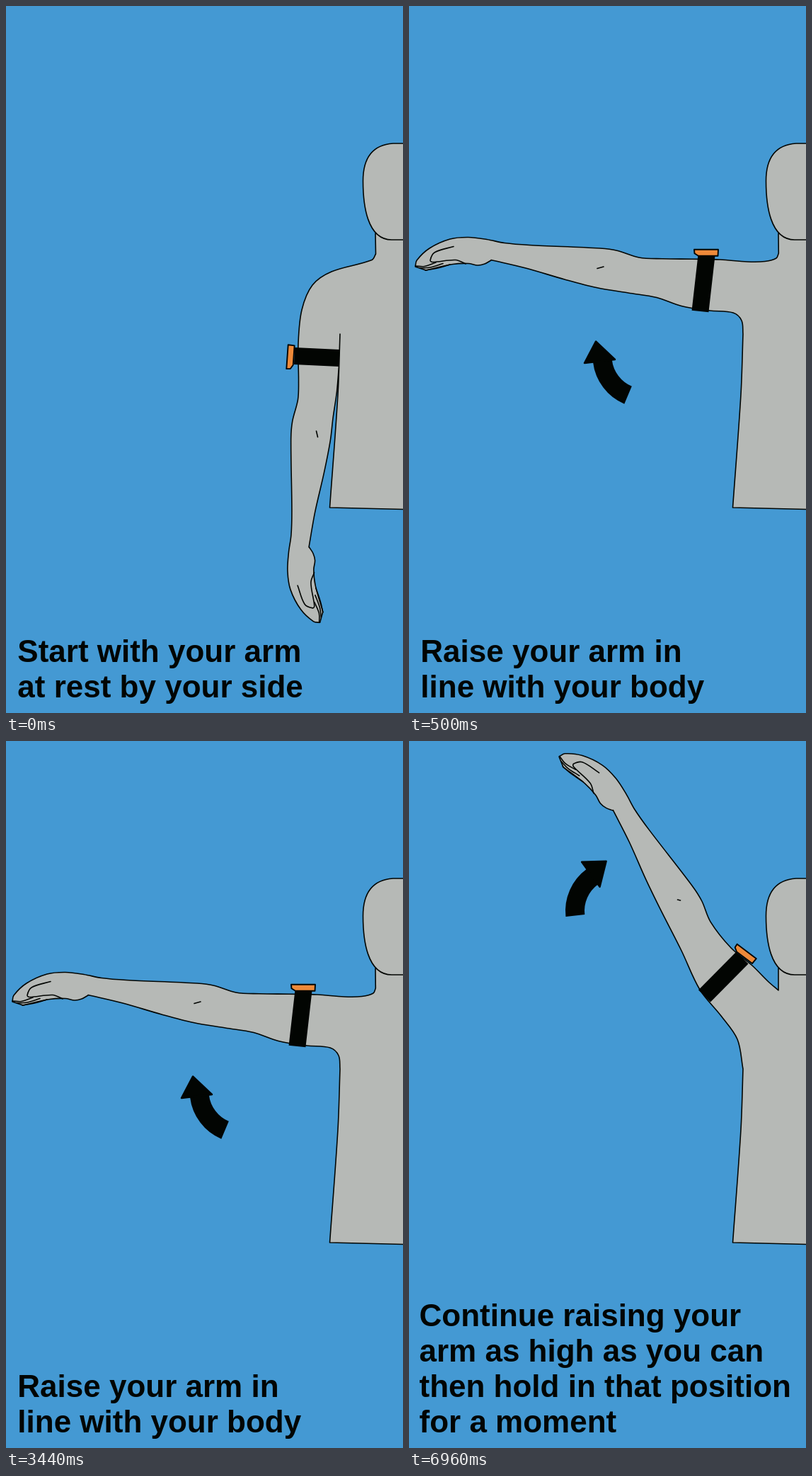
An HTML page with a canvas that plays this animation: 561 by 998 pixels, repeating every 8000 ms.

```html
<!DOCTYPE html>
<html lang="en">
<head>
<meta charset="utf-8">
<title>Arm raise</title>
<style>
html, body { margin: 0; width: 100%; height: 100%; overflow: hidden; background: #4499d3; }
canvas { display: block; width: 100vw; height: 100vh; }
</style>
</head>
<body>
<canvas id="stage" width="561" height="998"></canvas>
<script>
const ctx = document.getElementById('stage').getContext('2d');
const BLUE = '#4499d3', GREY = '#b6b9b6', INK = '#020502', ORANGE = '#ee8a3a';
const LOOP = 8000, LINE = 1.6;

const points = text => text.trim().split(/\s+/).map(p => p.split(',').map(Number));
const rad = deg => deg * Math.PI / 180;

// Smooth curve through the points, with handles a third of each step long.
function trace(pts) {
  const dirs = pts.map((p, i) => {
    const a = pts[i - 1] || p, b = pts[i + 1] || p;
    const turn = Math.atan2(b[1] - a[1], b[0] - a[0]);
    return [Math.cos(turn), Math.sin(turn)];
  });
  ctx.lineTo(...pts[0]);
  for (let i = 1; i < pts.length; i++) {
    const [x, y] = pts[i - 1], [u, v] = pts[i], d = dirs[i - 1], e = dirs[i];
    const k = Math.hypot(u - x, v - y) / 3;
    ctx.bezierCurveTo(x + d[0] * k, y + d[1] * k, u - e[0] * k, v - e[1] * k, u, v);
  }
}

function line(pts) {
  ctx.beginPath();
  trace(pts);
  ctx.stroke();
}

function shape(fill, width) {
  ctx.fillStyle = fill;
  ctx.fill();
  ctx.lineWidth = width;
  ctx.stroke();
}

function at([x, y, deg], paint) {
  ctx.save();
  ctx.translate(x, y);
  ctx.rotate(rad(deg));
  paint();
  ctx.restore();
}

// Forearm and hand pointing left, measured from the inner wrist.
const outer = points('209,-4 179,-13.5 154,-17 54,-21.5 19,-24.5 -6,-29.5 -32,-32.5 -58,-30 -87,-17 -105,0 -107,9');
const palm = points('-92,14 -54,5.5 -32,4.5 -19,7 -9,5 0,0');
const inner = points('0,-0.5 49,11 104,27 149,38.5');
const thumb = points('-53,-19.5 -80,-11 -86,0 -83,2.5 -50,-0.5 -36,5');
const side = points('472,463 469,548 457.5,708');

// wrist: x, y and turn of the forearm; over and under join it to the body.
const poses = [
  {
    from: 0,
    wrist: [428.5, 764, -93.3],
    over: points('522.5,350 517,358.5 460,375 433,394 418,429 413,476 413.5,530'),
    under: points('462,582 467.5,544 470.5,508'),
    fold: points('438.5,600 440.5,608.5'),
    band: points('407.5,494 471,497'),
    box: [402, 495.5, -86],
    textX: 16.3,
    text: ['Start with your arm', 'at rest by your side']
  },
  {
    from: 500,
    wrist: [116, 359, 0],
    over: points('522.3,349 519,356 503,360.5 478,361 440,358 400,357.3 358,356.8'),
    under: points('310,405 350,411.5 385,423.5 425,430 458,433 470,444 472,463'),
    fold: points('266,370.5 275,368'),
    band: points('420.5,352 411.5,431'),
    box: [420, 348.3, 0],
    arrow: [333, 494, 0],
    textX: 16.3,
    text: ['Raise your arm in', 'line with your body']
  },
  {
    from: 5400,
    wrist: [288, 98, 49.8],
    over: points('522,352 507,339 485,317 455,292'),
    under: points('385,296 411,351 441,388 464,421 472,463'),
    fold: points('379.5,224 383.5,225'),
    band: points('471,306 417.5,360'),
    box: [474.5, 300.5, 37],
    arrow: [294.5, 240, 60.7],
    textX: 14.5,
    text: ['Continue raising your', 'arm as high as you can', 'then hold in that position', 'for a moment']
  }
];

function drawBody({ wrist: [wx, wy, deg], over, under }) {
  const c = Math.cos(rad(deg)), s = Math.sin(rad(deg));
  const place = ([x, y]) => [wx + x * c - y * s, wy + x * s + y * c];
  ctx.beginPath();
  ctx.moveTo(575, 321);
  ctx.lineTo(522, 321);
  trace([...over, ...outer.map(place)]);
  trace(palm.map(place));
  trace([...inner.map(place), ...under]);
  trace(side);
  ctx.lineTo(575, 710.8);
  ctx.closePath();
  shape(GREY, LINE);
}

function drawCreases() {
  line(thumb);
  for (let i = 0; i < 3; i++)
    line([[-107 + 7 * i, 8 + 3 * i], [-94 + 8 * i, 8.5 + 1.5 * i], [-78 + 10 * i, 3 + 1.5 * i]]);
}

function drawHead() {
  ctx.beginPath();
  ctx.moveTo(575, 194);
  ctx.lineTo(547, 194);
  ctx.bezierCurveTo(517, 196, 504.5, 216, 504.5, 247);
  ctx.bezierCurveTo(504.5, 280, 510, 330, 545, 330);
  ctx.lineTo(575, 330);
  shape(GREY, LINE);
}

function drawBand(ends) {
  ctx.lineCap = 'butt';
  ctx.lineWidth = 24;
  line(ends);
}

function drawBox() {
  ctx.beginPath();
  trace([[-17, -4.5]]);
  for (const p of [[17, -4.5], [16.5, 4.5], [-11, 4.5], [-16.5, 1]]) ctx.lineTo(...p);
  ctx.closePath();
  shape(ORANGE, 1.9);
}

function drawArrow() {
  ctx.beginPath();
  ctx.arc(0, 0, 60, rad(113), rad(173));
  ctx.lineWidth = 27;
  ctx.stroke();
  ctx.beginPath();
  ctx.moveTo(-69, -20.5);
  ctx.lineTo(-85, 10);
  ctx.lineTo(-42, 5);
  ctx.closePath();
  shape(INK, 2.5);
}

function draw(pose) {
  ctx.fillStyle = BLUE;
  ctx.fillRect(0, 0, 561, 998);
  ctx.strokeStyle = INK;
  ctx.lineJoin = ctx.lineCap = 'round';

  drawBody(pose);
  at(pose.wrist, drawCreases);
  line(pose.fold);
  drawHead();
  drawBand(pose.band);
  at(pose.box, drawBox);
  if (pose.arrow) at(pose.arrow, drawArrow);

  ctx.fillStyle = INK;
  ctx.font = 'bold 44px "Liberation Sans", Arial, sans-serif';
  pose.text.forEach((row, i) =>
    ctx.fillText(row, pose.textX, 976 - 50 * (pose.text.length - 1 - i)));
}

const start = performance.now();
function frame() {
  const t = (performance.now() - start) % LOOP;
  draw(poses.findLast(p => p.from <= t));
  requestAnimationFrame(frame);
}
frame();
</script>
</body>
</html>
```
